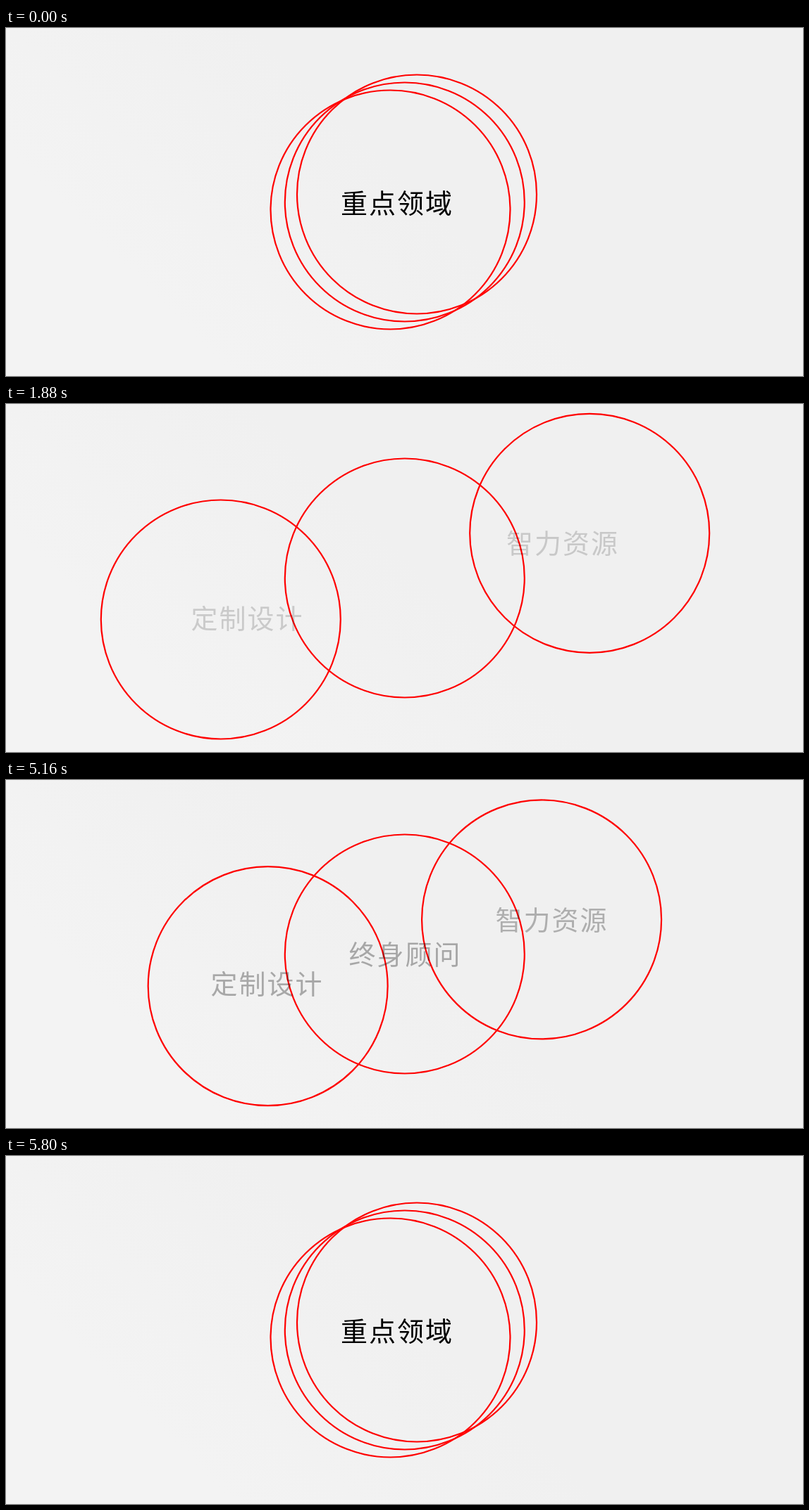
Write an HTML page that moves like this. It is 1131x495 px and loops after 5.84 s.

```html
<!DOCTYPE html>
<html lang="zh-CN">
<head>
<meta charset="utf-8">
<title>重点领域</title>
<style>
  html, body { margin: 0; width: 100%; height: 100%; overflow: hidden; }
  body { background: linear-gradient(45deg, #f3f3f3 20%, #f0f0f0 52%); }
  svg { display: block; width: 100%; height: 100%; }
  circle { fill: none; stroke: #f00; stroke-width: 2.2; }
  text {
    font: 400 38px "Noto Sans CJK SC", "Noto Sans CJK", sans-serif;
    letter-spacing: 2px;
  }
</style>
</head>
<body>
<svg viewBox="0 0 1131 495">
  <circle id="left" cx="545.5" cy="258.5" r="170"/>
  <circle cx="565.8" cy="247.5" r="170"/>
  <circle id="right" cx="583" cy="236.5" r="170"/>
  <text id="focus" x="475" y="262.5">重点</text>
  <text id="area" x="555" y="262.5">领域</text>
  <text id="design" x="234.5" y="327">定制设计</text>
  <text id="adviser" x="486.5" y="262">终身顾问</text>
  <text id="talent" x="750" y="201.5">智力资源</text>
</svg>
<script>
const LOOP = 5840, STEP = 40;
const OPEN = 1280, CLOSE = 4960, CLOSED = 5680;
const $ = id => document.getElementById(id);

// Linear progress from a to b, clamped to 0..1
const ramp = (t, a, b) => Math.min(1, Math.max(0, (t - a) / (b - a)));

function move(id, amount, dx, dy) {
  $(id).setAttribute("transform", `translate(${amount * dx} ${amount * dy})`);
}

// Fades run in linear light
function fade(id, visible) {
  $(id).style.opacity = 1 - Math.pow(1 - visible, 1 / 2.2);
}

function draw(time) {
  const t = Math.floor(time % LOOP / STEP) * STEP;
  const back = ramp(t, CLOSE, CLOSED);

  move("left", ramp(t, OPEN, 1880) - back, -240.7, 48);
  move("right", ramp(t, 1400, 1880) - back, 245.2, -52.7);

  // Heading splits apart, later joins again
  const heading = 1 - ramp(t, OPEN, 1780) + ramp(t, 5360, 5800);
  fade("focus", heading);
  fade("area", heading);
  if (t < CLOSE) {
    const split = ramp(t, OPEN, 1880);
    move("focus", split, -208, 54);
    move("area", split, 206, -79);
  } else {
    move("focus", 1 - back, -201, 65);
    move("area", 1 - back, 233, -61);
  }

  // Labels drift outwards while appearing, inwards while leaving
  const late = 1 - ramp(t, OPEN, 2000);
  const shown = ramp(t, 1720, 2220);
  const leave = ramp(t, CLOSE, 5400);
  fade("design", shown - leave);
  fade("talent", shown - ramp(t, CLOSE, 5360));
  fade("adviser", ramp(t, 1880, 2400) - leave);
  if (t < CLOSE) {
    move("design", late, 168, -48);
    move("talent", late, -240, 60);
  } else {
    move("design", back, 201.6, -83);
    move("talent", back, -200, 40);
  }
}

const start = performance.now();
function tick() {
  draw(performance.now() - start);
  requestAnimationFrame(tick);
}
tick();
</script>
</body>
</html>
```
